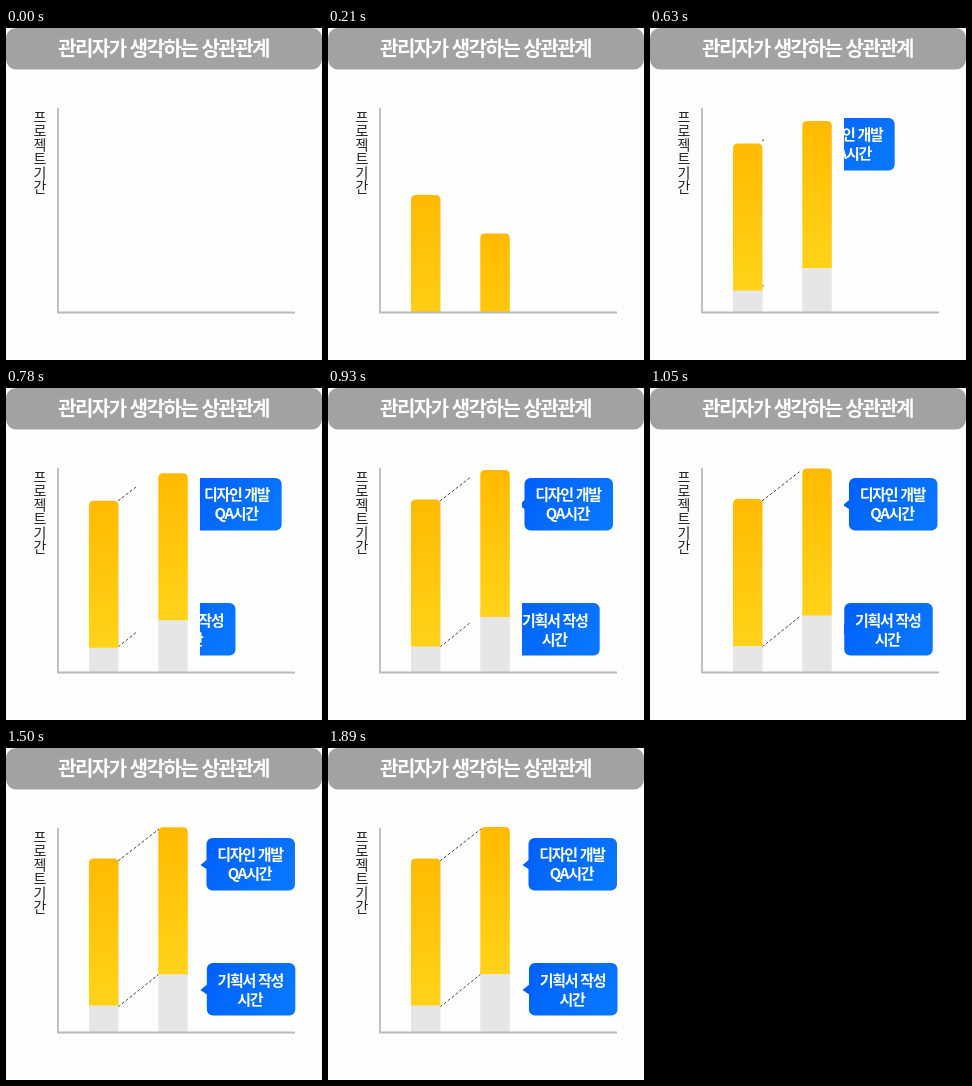
An HTML page for the animation above (2.7 s loop, 316x332 px).

```html
<!DOCTYPE html>
<html lang="ko">
<head>
<meta charset="utf-8">
<style>
html, body { margin: 0; width: 100%; height: 100%; overflow: hidden; background: #fdfdfe; }
svg { display: block; width: 316px; height: 332px; }
text { font-family: "Noto Sans CJK KR", "Noto Sans CJK", sans-serif; text-anchor: middle; fill: #fff; font-weight: 700; }
.title { font-size: 20px; letter-spacing: -1.5px; }
.axis { font-size: 14px; font-weight: 400; fill: #222; }
.label text { font-size: 15px; letter-spacing: -1.3px; }
.dash { stroke: #444; stroke-width: 1; stroke-dasharray: 3 2; }
</style>
</head>
<body>
<svg viewBox="0 0 316 332">
  <defs>
    <linearGradient id="gold" x2="0" y2="1">
      <stop offset="0" stop-color="#ffba00"/><stop offset="1" stop-color="#ffd31a"/>
    </linearGradient>
    <linearGradient id="blue" x2="1" y2=".4">
      <stop offset="0" stop-color="#005ffa"/><stop offset="1" stop-color="#0876ff"/>
    </linearGradient>
    <clipPath id="plot"><rect y="60" width="316" height="224"/></clipPath>
    <clipPath id="side"><rect x="194" y="60" width="122" height="224"/></clipPath>
  </defs>
  <rect width="316" height="41.5" rx="10" fill="#a2a2a2"/>
  <text class="title" x="157.5" y="28">관리자가 생각하는 상관관계</text>
  <g id="axisName"></g>
  <line class="dash" id="upper"/>
  <line class="dash" id="lower"/>
  <g clip-path="url(#plot)">
    <g id="bar1"><rect x="83" y="250" width="29.5" height="40" fill="#e6e6e6"/>
      <path d="M83 257.5V115.5q0-5 5-5h19.5q5 0 5 5v142z" fill="url(#gold)"/></g>
    <g id="bar2"><rect x="152.3" y="220" width="29.5" height="70" fill="#e6e6e6"/>
      <path d="M152.3 226V84q0-5 5-5h19.5q5 0 5 5v142z" fill="url(#gold)"/></g>
  </g>
  <path d="M52 80V284.5H289" fill="none" stroke="#b9b8c0" stroke-width="1.8"/>
  <g clip-path="url(#side)">
    <g class="label" id="label1">
      <path d="M202 111L194.5 117L202 122z" fill="#005ffa"/>
      <rect x="200.5" y="90" width="88.5" height="52.5" rx="6" fill="url(#blue)"/>
      <text x="244" y="111.5">디자인 개발</text><text x="243.5" y="131">QA시간</text>
    </g>
    <g class="label" id="label2">
      <path d="M202 236L194.5 242L202 247z" fill="#005ffa"/>
      <rect x="201" y="215" width="88.5" height="52.5" rx="6" fill="url(#blue)"/>
      <text x="244.5" y="237.5">기획서 작성</text><text x="244" y="257">시간</text>
    </g>
  </g>
</svg>
<script>
const LOOP = 2700, STEP = 30;
const el = id => document.getElementById(id);
const clamp = v => Math.min(1, Math.max(0, v));

el('axisName').innerHTML = [...'프로젝트기간']
  .map((c, i) => `<text class="axis" x="34" y="${94 + i * 14}">${c}</text>`).join('');

// Share of the way still to go, for exponential easing
const left = (t, start, rate) => Math.exp(-rate * Math.max(0, t - start));
const move = (id, x, y) => el(id).setAttribute('transform', `translate(${x} ${y})`);

function drawLine(id, x1, y1, x2, y2, p) {
  const line = el(id);
  const ends = { x1, y1, x2: x1 + (x2 - x1) * p, y2: y1 + (y2 - y1) * p };
  for (const k in ends) line.setAttribute(k, ends[k]);
  line.style.display = p ? '' : 'none';
}

function draw(t) {
  move('bar1', 0, 174 * left(t, 14, .00575));
  move('bar2', 0, 205 * left(t, 118, .00525));
  move('label1', -95.5 * left(t, 534, .008), 0);
  move('label2', -96 * left(t, 722, .0081), 0);
  const p = 1 - (1 - clamp((t - 615) / 617)) ** 2;
  drawLine('upper', 112, 113, 153, 81, p);
  drawLine('lower', 112, 259, 153, 226, p);
}

const begin = performance.now();
function tick() {
  const t = (performance.now() - begin) % LOOP;
  draw(Math.floor(t / STEP) * STEP);
  requestAnimationFrame(tick);
}
tick();
</script>
</body>
</html>
```
